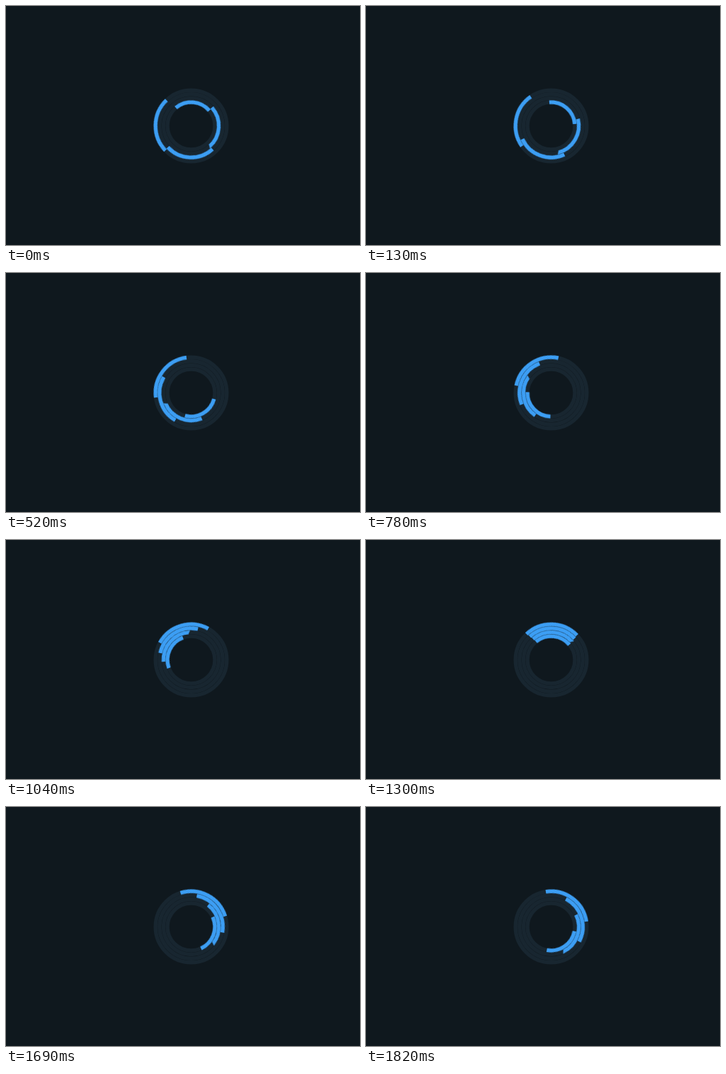
An HTML page that plays this animation: 500x338 px, repeating every 1950 ms.

```html
<!DOCTYPE html>
<html lang="en">
<head>
<meta charset="utf-8">
<title>Ring loader</title>
<style>
  html, body { margin: 0; width: 100%; height: 100%; overflow: hidden; background: #0f181e; }
  svg { display: block; width: 500px; height: 338px; }
  circle { fill: none; stroke-width: 5.4; }
  .track { stroke: #182630; }
  .arc {
    stroke: #3c9ef4;
    stroke-dasharray: 90 270;
    animation: sweep 1950ms infinite;
  }
  .r1 { --k: 1; r: 50.3px; }
  .r2 { --k: 2; r: 44.7px; }
  .r3 { --k: 3; r: 39.1px; }
  .r4 { --k: 4; r: 33.5px; }

  /* Each ring turns k times as fast as the outermost; all meet at the top. */
  @keyframes sweep {
    0%      { transform: rotate(calc(225deg - 88.8deg * var(--k))); animation-timing-function: steps(3); }
    20%     { transform: rotate(calc(225deg - 62deg * var(--k)));   animation-timing-function: steps(1); }
    26.666% { transform: rotate(calc(225deg - 52.5deg * var(--k))); animation-timing-function: steps(2); }
    40%     { transform: rotate(calc(225deg - 33.3deg * var(--k))); animation-timing-function: steps(2); }
    53.333% { transform: rotate(calc(225deg - 16.3deg * var(--k))); animation-timing-function: steps(3); }
    73.333% { transform: rotate(calc(225deg + 10.1deg * var(--k))); animation-timing-function: steps(3); }
    93.333%, 100% { transform: rotate(calc(225deg + 36.4deg * var(--k))); animation-timing-function: steps(1); }
  }
</style>
</head>
<body>
<svg viewBox="0 0 500 338">
  <g transform="translate(261.5 169.5)">
    <circle class="track r1" r="50.3"/>
    <circle class="track r2" r="44.7"/>
    <circle class="track r3" r="39.1"/>
    <circle class="track r4" r="33.5"/>
    <circle class="arc r1" r="50.3" pathLength="360"/>
    <circle class="arc r2" r="44.7" pathLength="360"/>
    <circle class="arc r3" r="39.1" pathLength="360"/>
    <circle class="arc r4" r="33.5" pathLength="360"/>
  </g>
</svg>
</body>
</html>
```
